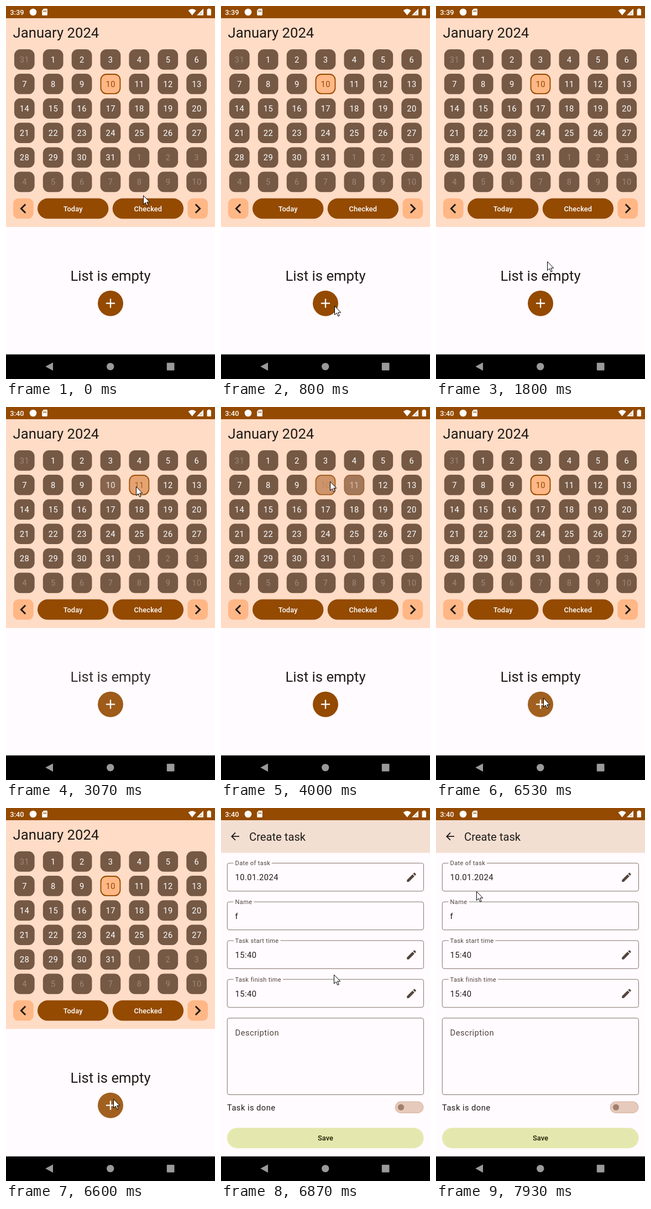
An HTML page that plays this animation: 378 by 672 pixels, repeating every 8000 ms.

```html
<!DOCTYPE html>
<html lang="en">
<head>
<meta charset="utf-8">
<title>Task calendar</title>
<style>
  html, body { margin: 0; width: 100%; height: 100%; overflow: hidden; background: #fffbff; }
  svg { display: block; width: 378px; height: 672px; font-family: Roboto, Arial, sans-serif; }
  .body { font-size: 14.7px; letter-spacing: .46px; }
  .small { font-size: 11.03px; letter-spacing: .37px; }
  .button { font-size: 12.87px; font-weight: 500; letter-spacing: .1px; }
  .headline { font-size: 25.7px; }
  .mid { text-anchor: middle; }
  .notch { paint-order: stroke; stroke: #fffbff; stroke-width: 8px; stroke-linejoin: round; }
</style>
</head>
<body>
<svg id="stage" viewBox="0 0 378 672"></svg>
<script>
const BROWN = '#944a00', PEACH = '#ffb786', INK = '#201a17', MUTED = '#52443b', GREY = '#9a9a9a';
const LOOP = 8000, STEP = 1000 / 15;
const CELL = 36.75, COLUMN = 51.9, ROW = 44.1;

// Times in ms.
const TAP_11 = 2867, TAP_10 = 3867, TAP_ADD = 6400, OPEN_FORM = 6600, CLOCK_TICK = 2530;

// Each pointer move eases along its own path.
const moves = [
  [67, 800, 'M248 341Q290 420 205 540'],
  [1000, 1800, 'M205 540Q70 510 120 445T201 460'],
  [1867, 2333, 'M201 460L235 143'],
  [3200, 3733, 'M235 143L197 134'],
  [4070, 4667, 'M197 134L194 119'],
  [4933, 5400, 'M194 119C230 150 115 150 182 150'],
  [5533, 6200, 'M182 150Q260 340 194 524'],
  [6600, 6867, 'M194 524L204 300'],
  [6867, 7533, 'M204 300Q200 230 339 118'],
  [7733, 7933, 'M339 118L73 150']
].map(([start, end, d]) => {
  const track = document.createElementNS('http://www.w3.org/2000/svg', 'path');
  track.setAttribute('d', d);
  return { start, end, track };
});

const ramp = (t, start, length) => Math.min(1, Math.max(0, (t - start) / length));
const smooth = p => p * p * (3 - 2 * p);
const easeOut = p => 1 - (1 - p) ** 3;

const selection = (t, tap) => easeOut(ramp(t, tap + 33, 330));
const ripple = (t, tap) => .12 * (ramp(t, tap - 67, 133) - ramp(t, tap + 270, 330));

// Two identical layers swapping by opacity dip in the middle.
function crossfade(t, tap) {
  const p = ramp(t, tap + 165, 300);
  return 1 - p * (1 - p);
}

function pointerAt(t) {
  const { start, end, track } = moves.filter(m => m.start <= t).pop() || moves[0];
  const p = smooth(ramp(t, start, end - start));
  return track.getPointAtLength(p * track.getTotalLength());
}

function mix(from, to, p) {
  const parts = c => [1, 3, 5].map(i => parseInt(c.slice(i, i + 2), 16));
  const b = parts(to);
  return `rgb(${parts(from).map((v, i) => Math.round(v + (b[i] - v) * p))})`;
}

const rect = (x, y, w, h, r, fill, extra = '') =>
  `<rect x="${x}" y="${y}" width="${w}" height="${h}" rx="${r}" fill="${fill}" ${extra}/>`;
const circle = (x, y, r, fill, extra = '') => `<circle cx="${x}" cy="${y}" r="${r}" fill="${fill}" ${extra}/>`;
const path = (d, fill, extra = '') => `<path d="${d}" fill="${fill}" ${extra}/>`;
const text = (x, y, s, cls, fill, extra = '') =>
  `<text x="${x}" y="${y}" class="${cls}" fill="${fill}" ${extra}>${s}</text>`;

function dayCell(i) {
  const x = 14.9 + (i % 7) * COLUMN, y = 78 + Math.floor(i / 7) * ROW;
  const day = (i + 30) % 31 + 1, outside = i === 0 || i > 31;
  return `<g id="day${i}">`
    + rect(x, y, CELL, CELL, 11, '#755945')
    + rect(x, y, CELL, CELL, 11, '#fff', 'opacity="0"')
    + rect(x + .9, y + .9, CELL - 1.8, CELL - 1.8, 10.1, 'none',
      `stroke="${BROWN}" stroke-width="1.8" opacity="0"`)
    + text(x + 18.6, y + 23.8, day, 'body mid', '#fff', outside ? 'opacity=".28"' : '')
    + '</g>';
}

function arrowButton(x, flip) {
  const middle = x + CELL / 2 - .5 * flip;
  return rect(x, 346.6, CELL, CELL, 9.5, PEACH)
    + path('M15.41 7.41 14 6l-6 6 6 6 1.41-1.41L10.83 12z', INK,
      `transform="translate(${middle} 365) scale(${flip * 1.47} 1.47) translate(-11.7 -12)"`);
}

const pill = (x, label) => rect(x, 346.6, 128.4, CELL, CELL / 2, BROWN)
  + text(x + 64.2, 369.8, label, 'button mid', '#fff');

function calendar() {
  return rect(0, 22, 378, 376, 0, '#ffdcc6')
    + text(12.6, 56.6, 'January 2024', 'headline', INK)
    + Array.from({ length: 42 }, (_, i) => dayCell(i)).join('')
    + arrowButton(12.9, 1) + pill(57, 'Today') + pill(192.7, 'Checked') + arrowButton(328.4, -1)
    + '<g id="empty">'
    + text(189, 495, 'List is empty', 'headline mid', INK)
    + circle(189, 535.7, 23, BROWN)
    + circle(189, 535.7, 23, '#fff', 'id="addRipple"')
    + path('M180.9 535.7h16.2M189 527.6v16.2', 'none', 'stroke="#fff" stroke-width="2.3"')
    + '</g>';
}

const outline = (y, h) => rect(11.3, y, 355.2, h, 3.7, 'none', 'stroke="#84746a"');

function field([label, value, editable], i) {
  const y = 99.3 + i * 69.8;
  const pencil = 'M3 17.25V21h3.75L17.81 9.94l-3.75-3.75zM20.71 7.04c.39-.39.39-1.02 0-1.41'
    + 'l-2.34-2.34c-.39-.39-1.02-.39-1.41 0l-1.83 1.83 3.75 3.75z';
  return outline(y, 50.5)
    + text(25.6, y + 4, label, 'small notch', MUTED)
    + text(25.6, y + 31, value, 'body', INK)
    + (editable ? path(pencil, MUTED, `transform="translate(333.5 ${y + 14.5}) scale(.919)"`) : '');
}

function taskForm() {
  const fields = [
    ['Date of task', '10.01.2024', true],
    ['Name', 'f', false],
    ['Task start time', '15:40', true],
    ['Task finish time', '15:40', true]
  ];
  return rect(0, 22, 378, 606, 0, '#fffbff')
    + rect(0, 22, 378, 58.8, 0, '#f3dfd2')
    + path('M33 51.2H19.5M26 44.5l-6.7 6.7 6.7 6.7', 'none', `stroke="${INK}" stroke-width="1.8"`)
    + text(51, 59, 'Create task', '', INK, 'font-size="20.2"')
    + fields.map(field).join('')
    + outline(378.5, 138)
    + text(25.6, 410, 'Description', 'body', MUTED)
    + text(11, 545, 'Task is done', 'body', INK)
    + rect(315.3, 529.3, 50.4, 20, 10, '#e6cabb', 'stroke="#dbbcab" stroke-width="1.4"')
    + circle(325.5, 539.2, 5.6, '#a07f6e')
    + rect(11, 576.2, 355.6, CELL, CELL / 2, '#e5e8ae')
    + text(189, 599.3, 'Save', 'button mid', '#1b1d00');
}

function systemBars() {
  return rect(0, 0, 378, 22, 0, BROWN)
    + text(7.3, 15.8, '', '', '#fff', 'id="clock" font-size="12.87" font-weight="500"')
    + circle(49, 11, 6.3, '#fff')
    + path('M68.3 4.8h5.4q1.1 0 1.1 1.1v9.9q0 1.1-1.1 1.1h-7.4q-1.1 0-1.1-1.1V8z', '#fff')
    + path('M68 8v2.8M70.2 8v2.8M72.4 8v2.8', 'none', `stroke="${BROWN}" stroke-width="1.2"`)
    + path('M336.7 16.8 329.6 8Q336.7 2.4 343.8 8z', '#fff')
    + path('M357 4.8v12h-12z', '#fff')
    + path('M354 10.5v4.5h-4.5z', BROWN, 'opacity=".35"')
    + rect(363.6, 5.8, 7.4, 11.1, 1, '#fff') + rect(365.4, 4.6, 3.8, 2, 0, '#fff')
    + rect(0, 627.7, 378, 44.3, 0, '#000')
    + path('M71.3 649.6 85 642.2v14.8z', GREY)
    + circle(188.7, 649.6, 6.7, GREY)
    + rect(290.8, 642.8, 13.7, 13.7, 1, GREY);
}

const stage = document.getElementById('stage');
stage.innerHTML = calendar()
  + `<g id="form">${taskForm()}</g>`
  + systemBars()
  + path('M.5.5V16.5L4.2 13.1 6.8 19 9.2 18 6.7 12.2H11.7z', '#fff',
    'id="pointer" stroke="#000" stroke-width="1" stroke-linejoin="round"');

const $ = id => document.getElementById(id);

function paintDay(id, selected, press) {
  const [cell, glow, border, label] = $(id).children;
  const ink = mix('#ffffff', BROWN, selected);
  cell.setAttribute('fill', mix('#755945', PEACH, selected));
  glow.setAttribute('fill', ink);
  glow.setAttribute('opacity', press);
  border.setAttribute('opacity', selected);
  label.setAttribute('fill', ink);
}

function draw(t) {
  const moved = selection(t, TAP_11) - selection(t, TAP_10);
  paintDay('day10', 1 - moved, ripple(t, TAP_10));
  paintDay('day11', moved, ripple(t, TAP_11));
  $('empty').setAttribute('opacity', crossfade(t, TAP_11) * crossfade(t, TAP_10));
  $('addRipple').setAttribute('opacity', .12 * ramp(t, TAP_ADD, 133));
  $('form').setAttribute('opacity', ramp(t, OPEN_FORM, 133));
  $('clock').textContent = t < CLOCK_TICK ? '3:39' : '3:40';
  const { x, y } = pointerAt(t);
  $('pointer').setAttribute('transform', `translate(${Math.round(x)} ${Math.round(y)})`);
}

const start = performance.now();
function tick() {
  // The picture advances in 15 fps steps; the offset absorbs rounding at their edges.
  const t = (performance.now() - start) % LOOP + 4;
  draw(Math.min(LOOP - STEP, Math.floor(t / STEP) * STEP));
  requestAnimationFrame(tick);
}
tick();
</script>
</body>
</html>
```
